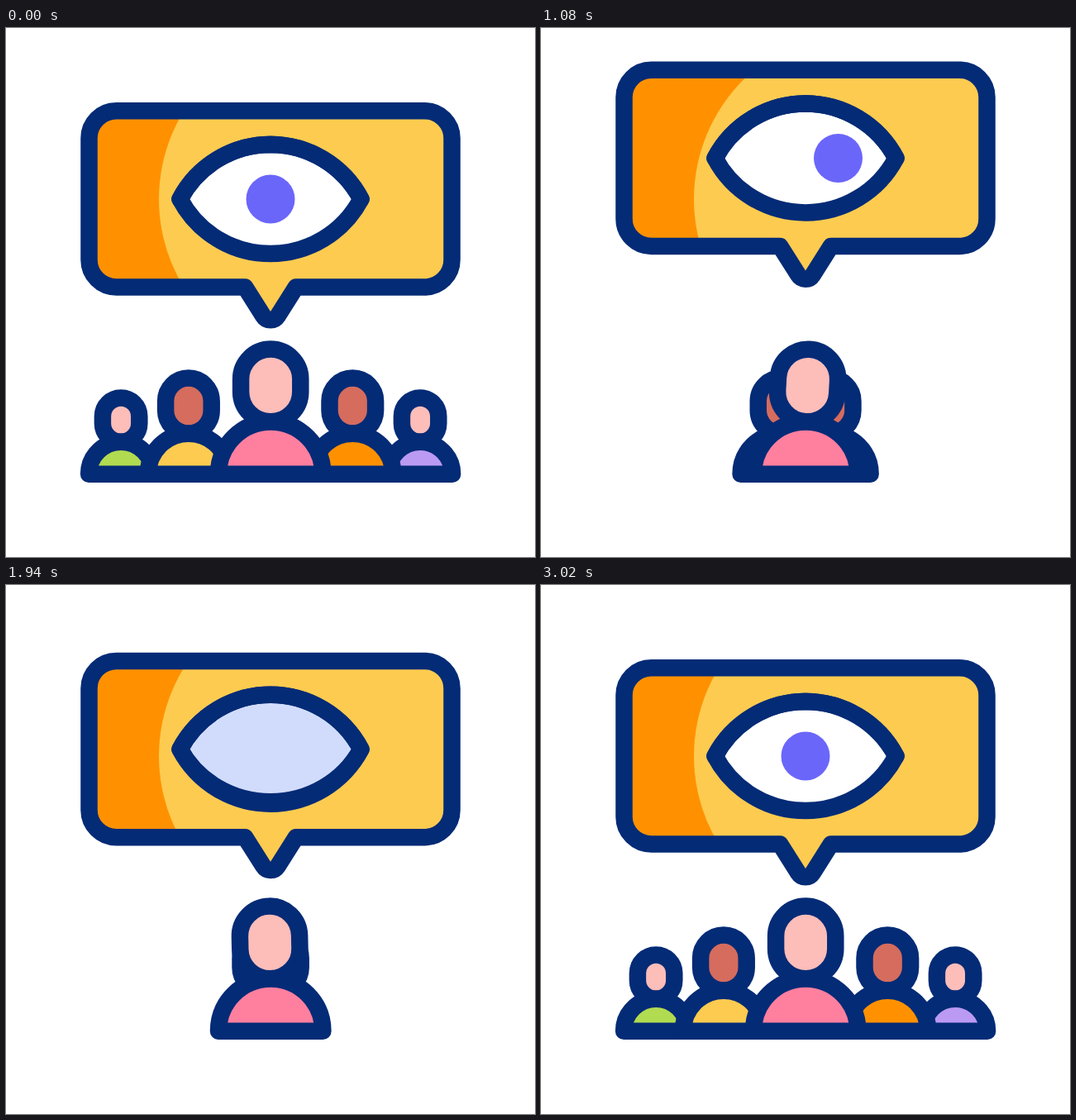
Write an HTML page that moves like this. It is 640x640 px and loops after 3600 ms.

```html
<!DOCTYPE html>
<html lang="en">
<head>
<meta charset="utf-8">
<title>Audience view</title>
<style>
  html, body { margin: 0; width: 100%; height: 100%; overflow: hidden; background: #fff; }
  svg { display: block; width: 100vw; height: 100vh; }
  .line { stroke: #042b76; stroke-width: 20.5; stroke-linejoin: round; stroke-linecap: round; }
</style>
</head>
<body>
<svg viewBox="0 0 640 640">
  <defs>
    <path id="shape" d="M133.5 100.3H506.500A33 33 0 0 1 539.500 133.300V280.500A33 33 0 0 1 506.500 313.500H350.800L328.700 348.500A10.250 10.250 0 0 1 311.300 348.500L289.200 313.500H133.500A33 33 0 0 1 100.500 280.500V133.300A33 33 0 0 1 133.500 100.300Z"/>
    <clipPath id="inside"><use href="#shape"/></clipPath>
  </defs>
  <g id="bubble">
    <use href="#shape" fill="#ff9100"/>
    <g clip-path="url(#inside)">
      <path id="glow" fill="#fdcb50" d="M389 3A204 204 0 0 0 389 411H600V3Z"/>
    </g>
    <use href="#shape" fill="none" class="line"/>
    <g transform="translate(320 207)">
      <path id="white" fill="#fff"/>
      <circle id="pupil" r="29.5" fill="#6b66fa"/>
      <path id="lid" fill="#d1dcfd" class="line"/>
      <path id="rim" fill="none" class="line"/>
    </g>
  </g>
  <g id="crowd"></g>
</svg>
<script>
const LOOP = 3600, STEP = 20, BASE = 539.7, OPEN = 66;
const $ = id => document.getElementById(id);

// Each track is a list of [time, value], eased in and out between stops.
const tracks = {
  bubble: [[0, 0], [1200, -51], [2400, 12.5], [3000, 0]],
  pupil: [[600, 0], [1000, 39.5], [2007, 39.5], [2407, 0]],
  lid: [[400, OPEN], [560, -OPEN], [960, OPEN], [1793, OPEN], [1953, -OPEN], [2353, OPEN]],
  tilt: [[0, 0], [500, -7], [1200, 4], [1800, -1.5], [2400, 0]],
  outer: [[314, 181], [914, 0], [2220, 0], [2820, 181]],
  inner: [[697, 99.2], [1297, 0], [1830, 0], [2430, 99.2]]
};

function at(track, t) {
  if (t <= track[0][0]) return track[0][1];
  for (let i = 1; i < track.length; i++) {
    const [t0, a] = track[i - 1], [t1, b] = track[i];
    if (t < t1) {
      const s = (t - t0) / (t1 - t0);
      return a + (b - a) * s * s * (3 - 2 * s);
    }
  }
  return track[track.length - 1][1];
}

// Closed shape between the upper eye arc and an arc of height k.
function eye(k) {
  const n = h => (-h / OPEN);
  const u = n(OPEN), v = n(k);
  return `M-109.5 0C-88.1 ${40.6 * u} -45.9 ${66 * u} 0 ${66 * u}` +
    `S88.1 ${40.6 * u} 109.5 0` +
    `C88.1 ${40.6 * v} 45.9 ${66 * v} 0 ${66 * v}` +
    `S-88.1 ${40.6 * v} -109.5 0Z`;
}

function person(half, top, bottom, r, skin, shirt) {
  const g = document.createElementNS("http://www.w3.org/2000/svg", "g");
  g.innerHTML =
    `<rect class="line" x="${-half}" y="${top}" width="${2 * half}" height="${bottom - top}" rx="${half}" fill="${skin}"/>` +
    `<path class="line" d="M${-r} ${BASE}A${r} ${r} 0 0 1 ${r} ${BASE}Z" fill="${shirt}"/>`;
  $("crowd").append(g);
  return g;
}

const small = [22.2, 447.6, 500.7, 39], medium = [27.8, 423.6, 490.6, 49];
const pale = "#fdbdb9", dark = "#d56c5e";
const sides = [
  [person(...small, pale, "#b1db50"), -1, tracks.outer],
  [person(...small, pale, "#bb9af3"), 1, tracks.outer],
  [person(...medium, dark, "#fdcb50"), -1, tracks.inner],
  [person(...medium, dark, "#ff9100"), 1, tracks.inner]
];
const leader = person(36.1, 388.6, 476.3, 63.2, pale, "#ff7f9f");
leader.setAttribute("transform", "translate(320.2 0)");

$("white").setAttribute("d", eye(-OPEN));
$("rim").setAttribute("d", eye(-OPEN));

function draw(now) {
  const t = Math.floor((now % LOOP) / STEP) * STEP;
  const y = at(tracks.bubble, t);
  $("bubble").setAttribute("transform", `translate(0 ${y})`);
  $("glow").setAttribute("transform", `translate(0 ${-y})`);
  $("pupil").setAttribute("cx", at(tracks.pupil, t));
  $("lid").setAttribute("d", eye(at(tracks.lid, t)));
  leader.firstChild.setAttribute("transform", `rotate(${at(tracks.tilt, t)} 0 477)`);
  for (const [g, side, track] of sides) {
    g.setAttribute("transform", `translate(${320.1 + side * at(track, t)} 0)`);
  }
}

function frame() {
  draw(performance.now());
  requestAnimationFrame(frame);
}
draw(0);
requestAnimationFrame(frame);
</script>
</body>
</html>
```
